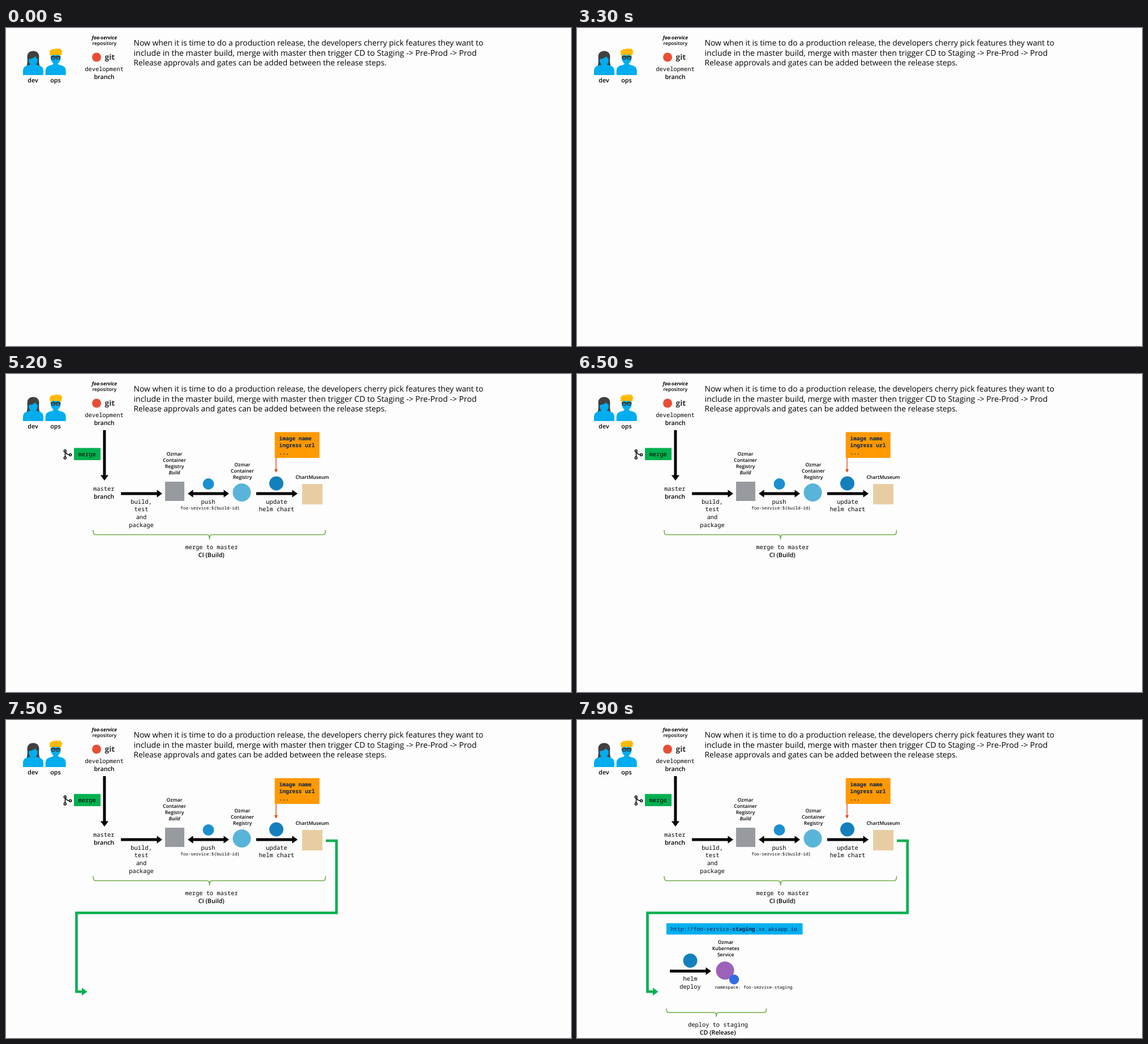
Write an HTML page that moves like this. It is 998 px wide and 561 px high and loops after 8000 ms.

```html
<!DOCTYPE html>
<html lang="en">
<head>
<meta charset="utf-8">
<title>Release pipeline</title>
<style>
html, body { margin: 0; width: 100%; height: 100%; overflow: hidden; background: #fdfdfd; }
svg { display: block; width: 998px; height: 561px; }
text { font-family: "Open Sans", "Noto Sans", sans-serif; text-rendering: geometricPrecision; }
.label { font-size: 8.6px; font-weight: 600; text-anchor: middle; }
.title { font-size: 10.7px; font-weight: 600; text-anchor: middle; }
.mono { font: 10.4px "Noto Sans Mono", "DejaVu Sans Mono", monospace; text-anchor: middle; }
.tiny { font-size: 7.6px; }
.code { font-size: 9.55px; fill: #002050; text-anchor: start; }
.bold { font-weight: 700; }
.brace { fill: none; stroke: #70ad47; stroke-width: 1.7; }
</style>
</head>
<body>
<svg viewBox="0 0 998 561">
  <defs>
    <path id="arrow" d="M0-2.4H63.5V-6.7L73 0 63.5 6.7V2.4H0Z"/>
    <path id="bust" d="M-18 83V75Q-18 67-8 65.5Q-4 65-4 62H4Q4 65 8 65.5Q18 67 18 75V83Z" fill="#00adef"/>
  </defs>

  <g id="intro">
    <g transform="translate(48 0)">
      <path d="M-11.5 67Q-9.5 60-10.5 51C-10.5 44-6 40.5 0 40.5S10.5 44 10.5 51Q9.5 60 11.5 67Z" fill="#404040"/>
      <use href="#bust"/>
      <path d="M-8 55Q0 54 4 50Q5 53 8 55Q8 66 0 66T-8 55Z" fill="#00adef"/>
    </g>
    <g transform="translate(87.7 0)">
      <use href="#bust"/>
      <ellipse cy="53.5" rx="8.7" ry="10" fill="#00adef"/>
      <path d="M-9 49Q-12 47-10 44Q-12 40-8 39Q-6 36-2 37.5Q1 35 4 37Q9 35 10 39Q13 41 10.5 44Q11 48 8.5 49Q4 46 0 48Q-5 46-9 49Z" fill="#ffb900"/>
      <g fill="none" stroke="#333" stroke-width="1.6">
        <rect x="-7.3" y="50" width="6" height="5" rx="2"/>
        <rect x="1.3" y="50" width="6" height="5" rx="2"/>
        <path d="M-9 51H9"/>
      </g>
    </g>
    <text class="title" x="47.5" y="96">dev</text>
    <text class="title" x="87.5" y="95.5">ops</text>

    <text class="label bold" x="173.8" y="19.5" font-style="italic">foo-service</text>
    <text class="label" x="173.8" y="30.2">repository</text>
    <circle cx="160" cy="51.5" r="8" fill="#e84e36"/>
    <text x="174.5" y="56" font-size="13.5" font-weight="700" fill="#333">git</text>
    <text class="mono" x="173.5" y="75.5">development</text>
    <text class="title" x="173.5" y="89.5">branch</text>

    <text x="225.5" y="31.2" font-size="13.85">Now when it is time to do a production release, the developers cherry pick features they want to</text>
    <text x="225.5" y="48.7" font-size="14.05">include in the master build, merge with master then trigger CD to Staging -&gt; Pre-Prod -&gt; Prod</text>
    <text x="225.5" y="66.1" font-size="13.77">Release approvals and gates can be added between the release steps.</text>
  </g>

  <g id="build">
    <path d="M171.4 99H176.4V178.5H181L173.9 188 166.8 178.5H171.4Z"/>
    <g fill="none" stroke="#000" stroke-width="1.5">
      <path d="M104.5 137V147M105 137Q107 142.5 112 142.5"/>
      <g fill="#fdfdfd">
        <circle cx="104.3" cy="135.7" r="1.9"/>
        <circle cx="104.3" cy="148" r="1.9"/>
        <circle cx="113.7" cy="142.5" r="1.9"/>
      </g>
    </g>
    <rect x="120" y="130.5" width="47" height="21.5" fill="#00b050"/>
    <text class="mono" x="143.2" y="144.8">merge</text>
    <text class="mono" x="172.8" y="206">master</text>
    <text class="title" x="173" y="220">branch</text>

    <use href="#arrow" x="203" y="211"/>
    <text class="mono" x="239" y="228.5">build,</text>
    <text class="mono" x="239" y="242">test</text>
    <text class="mono" x="239" y="256">and</text>
    <text class="mono" x="239" y="269.5">package</text>

    <text class="label" x="297.5" y="143.5">Ozmar</text>
    <text class="label" x="297.5" y="154.5">Container</text>
    <text class="label" x="297.5" y="165.7">Registry</text>
    <text class="label" x="297.5" y="177" font-style="italic">Build</text>
    <rect x="281" y="190" width="34" height="34" fill="#979ba0"/>

    <path d="M321 211L330.5 204.3V208.6H384.5V204.3L394 211 384.5 217.7V213.4H330.5V217.7Z"/>
    <circle cx="357.5" cy="194" r="10" fill="#1b8fcf"/>
    <text class="mono" x="357" y="228.5">push</text>
    <text class="mono tiny" x="360.5" y="238.5">foo-service:${build-id}</text>

    <text class="label" x="417.5" y="162.7">Ozmar</text>
    <text class="label" x="417.5" y="173.8">Container</text>
    <text class="label" x="417.5" y="184.8">Registry</text>
    <circle cx="416.5" cy="209" r="16" fill="#59b4d9"/>

    <use href="#arrow" x="442" y="211"/>
    <circle cx="477.5" cy="193" r="12.5" fill="#1380bd"/>
    <text class="mono" x="478" y="228.5">update</text>
    <text class="mono" x="478" y="242">helm chart</text>

    <rect x="474.7" y="102.5" width="79" height="45.5" fill="#ff9900"/>
    <path d="M476.3 148H477.7V168H480L477 174 474 168H476.3Z" fill="#e0491b"/>
    <text class="mono code bold" x="482.5" y="116.5">image name</text>
    <text class="mono code bold" x="482.5" y="129">ingress url</text>
    <text class="mono code bold" x="482.5" y="142">...</text>

    <text class="label" x="541" y="184.5">ChartMuseum</text>
    <rect x="523" y="194" width="36" height="36" fill="#e8cda3"/>

    <path class="brace" d="M154 275.5Q154 283.5 158 283.5H355.5Q359.5 283.5 359.5 292Q359.5 283.5 363.5 283.5H560.5Q564.5 283.5 564.5 275.5"/>
    <text class="mono" x="363" y="308.5">merge to master</text>
    <text class="title" x="362.7" y="322.7">CI (Build)</text>
  </g>

  <g id="handoff">
    <path d="M565 213H583.7V340.2H124.5V479.3H136" fill="none" stroke="#00b050" stroke-width="4.6"/>
    <path d="M134 472.3L143.5 479.3 134 486.3Z" fill="#00b050"/>
  </g>

  <g id="staging">
    <rect x="158" y="358.5" width="240.5" height="20" fill="#00b0f0"/>
    <text class="mono code" x="165.5" y="372">http://foo-service-<tspan class="bold">staging</tspan>.xx.aksapp.io</text>

    <circle cx="200" cy="424.5" r="12.5" fill="#1380bd"/>
    <use href="#arrow" x="164" y="443"/>
    <text class="mono" x="200" y="460">helm</text>
    <text class="mono" x="200" y="473.5">deploy</text>

    <text class="label" x="262.7" y="394.8">Ozmar</text>
    <text class="label" x="262.7" y="405.8">Kubernetes</text>
    <text class="label" x="262.7" y="417">Service</text>
    <circle cx="261.5" cy="442" r="16" fill="#9b62b8"/>
    <circle cx="277.5" cy="457.7" r="8.7" fill="#326ce5"/>
    <text class="mono tiny" x="312.2" y="473.5">namespace: foo-service-staging</text>

    <path class="brace" d="M158 509Q158 516 161.5 516H242.7Q246.2 516 246.2 523.5Q246.2 516 249.7 516H331Q334.5 516 334.5 509"/>
    <text class="mono" x="249" y="540.5">deploy to staging</text>
    <text class="title" x="248.7" y="554.5">CD (Release)</text>
  </g>
</svg>
<script>
const LOOP = 8000;
const startTimes = { build: 4000, handoff: 6600, staging: 7600 };
const start = performance.now();

function draw() {
  const time = (performance.now() - start) % LOOP;
  for (const id in startTimes) {
    document.getElementById(id).style.display = time >= startTimes[id] ? "" : "none";
  }
  requestAnimationFrame(draw);
}
draw();
</script>
</body>
</html>
```
